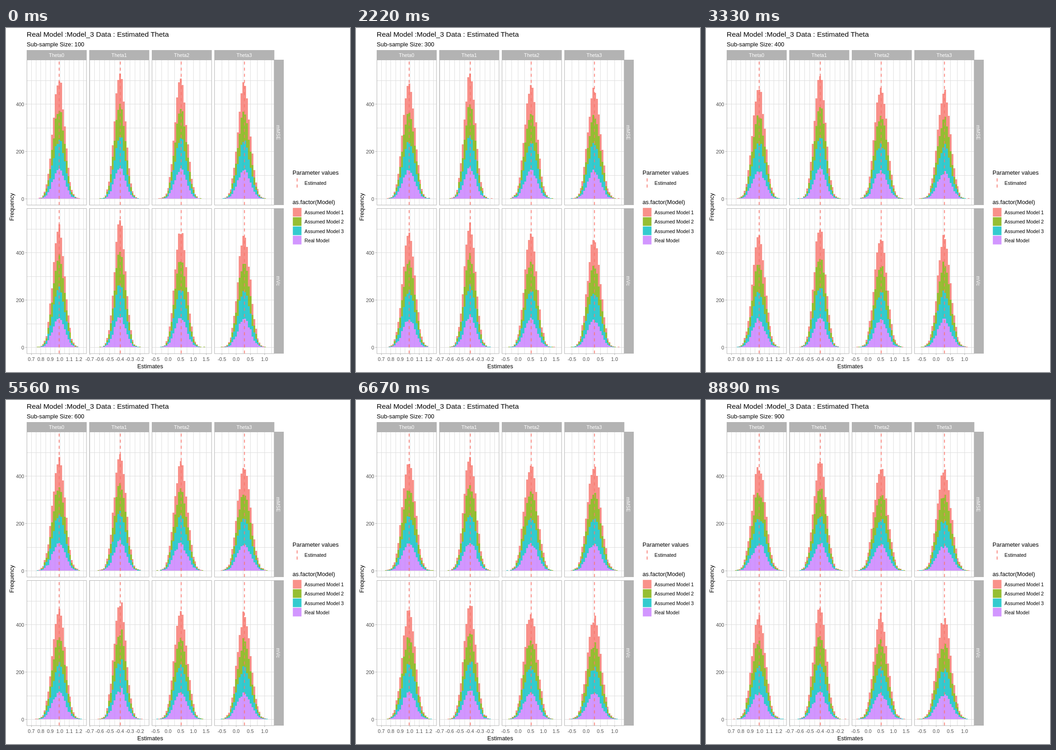
Animation of 748 by 748 pixels, one loop 10000 ms. Source, as an HTML page:

```html
<!DOCTYPE html>
<html lang="en">
<head>
<meta charset="utf-8">
<title>Estimated Theta</title>
<style>
  html, body { margin: 0; width: 100%; height: 100%; overflow: hidden; background: #fff; }
  svg { display: block; width: 748px; height: 748px; }
  text { font-family: "Liberation Sans", Arial, sans-serif; font-size: 10.7px; }
  path, .rule { shape-rendering: crispEdges; }
  .title { font-size: 15.5px; }
  .head { font-size: 12.8px; }
  .axis { fill: #4d4d4d; }
  .strip { fill: #fff; }
  .vline { stroke: #f8766d; stroke-width: 1.66; stroke-dasharray: 6.64 6.64; }
</style>
</head>
<body>
<svg id="stage" viewBox="0 0 748 748"></svg>
<script>
const stage = document.getElementById('stage');
const STEPS = 9, LOOP = 10000;
const COLORS = ['#c77cff', '#00bfc4', '#7cae00', '#f8766d'];
const GRAY = '#b3b3b3', GRID = '#dedede';
const W = 130, H = 316, ZERO = 302.4, UNIT = 0.514;
const BINS = 30, PAD = 6, BIN = (W - 2 * PAD) / BINS, DRAWS = 4000;

// zero: pixel place of the value 0; unit: pixels per 1; peak: height of the tallest bars
const COLS = [
  { zero: -89.5, unit: 206.5, from: 0.7, by: 0.1, n: 6, theta: 0.993, peak: 500 },
  { zero: 334.6, unit: 218, from: -0.7, by: 0.1, n: 6, theta: -0.395, peak: 535 },
  { zero: 352.5, unit: 55, from: -0.5, by: 0.5, n: 5, theta: 0.515, peak: 495 },
  { zero: 500.4, unit: 61.8, from: -0.5, by: 0.5, n: 4, theta: 0.293, peak: 478 }
];
COLS.forEach((col, c) => {
  col.x = 45 + 136 * c;
  col.line = col.zero + col.theta * col.unit;
  col.mid = col.line - 0.8;
});
const ROWS = [{ y: 69, name: 'mMSE' }, { y: 392, name: 'mVc' }];

function add(parent, tag, attrs, text) {
  const el = document.createElementNS('http://www.w3.org/2000/svg', tag);
  for (const key in attrs) el.setAttribute(key, attrs[key]);
  if (text !== undefined) el.textContent = text;
  return parent.appendChild(el);
}
const label = (x, y, text, cls, anchor = 'start', turn = 0) =>
  add(stage, 'text', { x, y, class: cls, 'text-anchor': anchor,
    transform: `rotate(${turn} ${x} ${y})` }, text);
const box = (x, y, width, height, attrs) =>
  add(stage, 'rect', { x, y, width, height, ...attrs });
const snap = v => Math.floor(v) + 0.5;
const rule = (x1, y1, x2, y2, stroke) =>
  add(stage, 'line', { x1, y1, x2, y2, stroke, class: 'rule' });
// Dashes run upwards from the bottom end
const dashes = (x, bottom, top) =>
  add(stage, 'line', { x1: x, x2: x, y1: bottom, y2: top, class: 'vline' });

function random(seed) {
  let a = seed;
  return () => {
    a = (a + 0x6d2b79f5) | 0;
    let t = Math.imul(a ^ (a >>> 15), 1 | a);
    t = (t + Math.imul(t ^ (t >>> 7), 61 | t)) ^ t;
    return ((t ^ (t >>> 14)) >>> 0) / 4294967296;
  };
}

// Four stacked bar paths for one panel: a bell that widens as the size grows
function bars(step, panel) {
  const col = COLS[panel % 4], base = Math.round(ROWS[panel >> 2].y + ZERO);
  const rnd = random((step + 1) * 3100 + panel * 977);
  const noise = () => rnd() + rnd() + rnd() - 1.5;
  const peak = col.peak * (1 - 0.13 * step / (STEPS - 1));
  const sd = BIN * DRAWS / (peak * Math.sqrt(2 * Math.PI));
  const paths = ['', '', '', ''];
  for (let k = 0; k < BINS; k++) {
    const left = col.x + PAD + k * BIN;
    const z = (left + BIN / 2 - col.mid) / sd;
    const bell = peak * Math.exp(-z * z / 2) + 4 * Math.exp(-Math.abs(z) / 1.5);
    const total = Math.max(0, bell + noise() * Math.sqrt(bell));
    const spread = Math.min(0.9, 1.6 / Math.sqrt(total + 1));
    const parts = paths.map(() => 1 + noise() * spread);
    const sum = parts.reduce((a, b) => a + b);
    const x1 = Math.round(left), x2 = Math.round(left + BIN);
    let run = 0, low = base;
    parts.forEach((part, m) => {
      run += part / sum;
      const top = Math.round(base - total * run * UNIT);
      if (top < low) paths[m] += `M${x1} ${low}V${top}H${x2}V${low}Z`;
      low = top;
    });
  }
  return paths;
}

// Titles
label(45, 19, 'Real Model :Model_3 Data : Estimated Theta', 'title');
const subtitle = label(45, 39.5, '', 'head');
label(313.5, 740, 'Estimates', 'head', 'middle');
label(17, 389, 'Frequency', 'head', 'middle', -90);

// Panels
const layers = [];
ROWS.forEach(row => {
  const zero = row.y + ZERO;
  COLS.forEach(col => {
    for (let i = 0; i < 6; i++) {
      const y = snap(zero - i * 100 * UNIT);
      rule(col.x, y, col.x + W, y, GRID);
    }
    const half = col.by * col.unit / 2;
    for (let x = col.zero + col.from * col.unit; x < col.x + W; x += half)
      rule(snap(x), row.y, snap(x), row.y + H, GRID);
    layers.push(COLORS.map(fill => add(stage, 'path', { fill, 'fill-opacity': 0.8 })));
    dashes(col.line, row.y + H, row.y);
    box(col.x + 0.5, row.y + 0.5, W - 0.5, H - 0.5, { fill: 'none', stroke: GRAY });
  });
  [0, 200, 400].forEach(v => {
    const y = snap(zero - v * UNIT);
    rule(42, y, 45, y, GRAY);
    label(39.5, y + 4, v, 'axis', 'end');
  });
  box(583, row.y, 21, H, { fill: GRAY });
  label(588, row.y + H / 2, row.name, 'strip', 'middle', 90);
});

// Column strips and horizontal axes
COLS.forEach((col, c) => {
  box(col.x, 48, W + 0.5, 21, { fill: GRAY });
  label(col.x + W / 2, 63, 'Theta' + c, 'strip', 'middle');
  for (let i = 0; i < col.n; i++) {
    const value = col.from + i * col.by, x = col.zero + value * col.unit;
    rule(snap(x), 708, snap(x), 711, GRAY);
    label(x, 724, value.toFixed(1), 'axis', 'middle');
  }
});

// Legends
label(623, 319, 'Parameter values', 'head');
dashes(633, 347, 327);
label(649, 341, 'Estimated');
label(623, 383, 'as.factor(Model)', 'head');
['Assumed Model 1', 'Assumed Model 2', 'Assumed Model 3', 'Real Model'].forEach((name, i) => {
  const y = 391.2 + i * 20.2;
  box(623.7, y, 18.8, 18.8, { fill: COLORS[3 - i], 'fill-opacity': 0.8 });
  label(649, Math.round(y + 14), name);
});

let shown = -1;
function show(step) {
  subtitle.textContent = 'Sub-sample Size: ' + (step + 1) * 100;
  layers.forEach((set, panel) =>
    bars(step, panel).forEach((d, m) => set[m].setAttribute('d', d)));
  shown = step;
}

// Steps change on the nearest hundredth of a second
const startOf = step => Math.round(step * LOOP / STEPS / 10) * 10;
const begin = performance.now();
function tick() {
  const t = (performance.now() - begin) % LOOP;
  let step = STEPS - 1;
  while (startOf(step) > t) step--;
  if (step !== shown) show(step);
  requestAnimationFrame(tick);
}
show(0);
requestAnimationFrame(tick);
</script>
</body>
</html>
```
